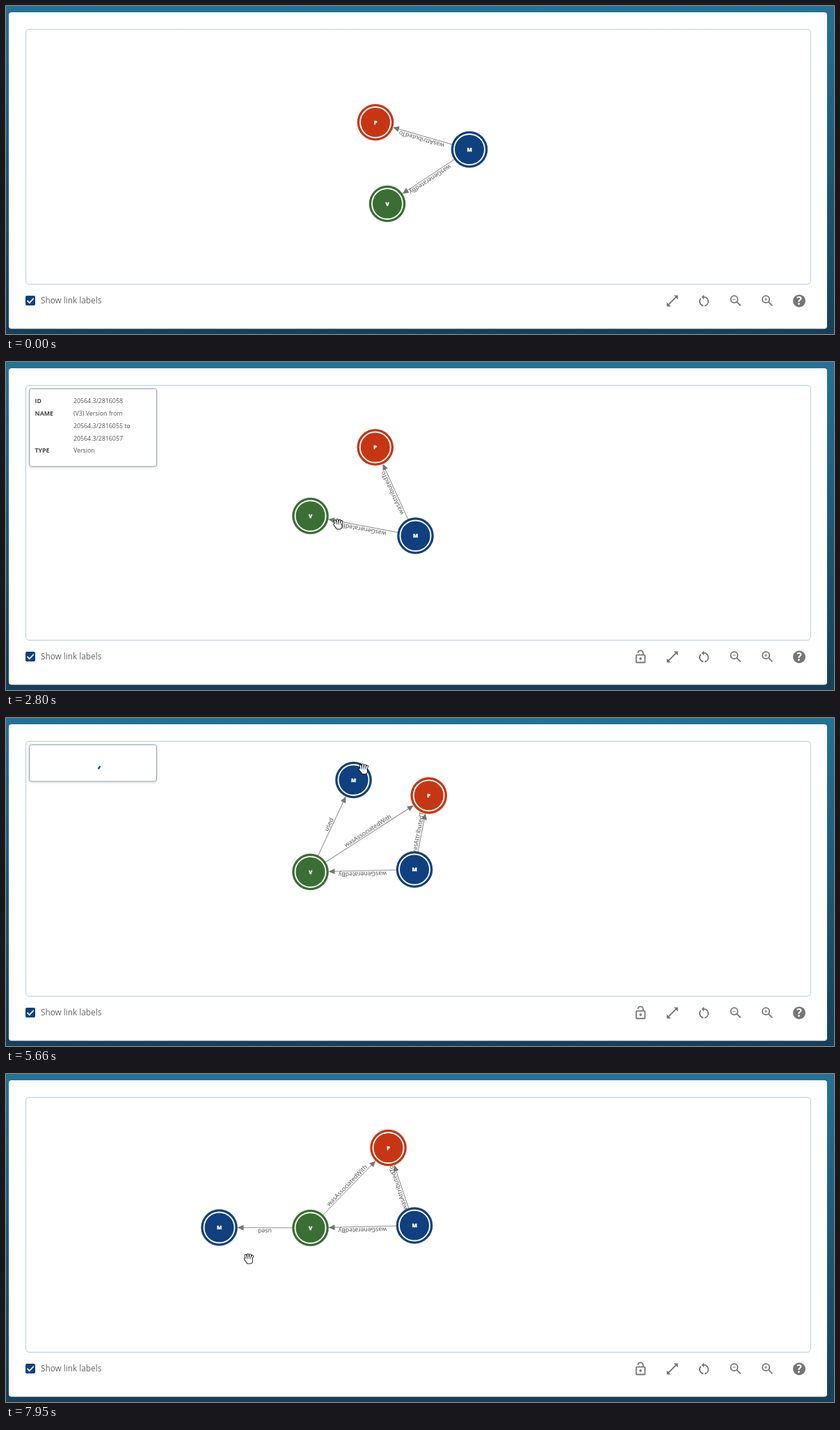
These frames come from a looping animation (1190 px wide and 471 px high, 8 s). An HTML page:

```html
<!DOCTYPE html>
<html lang="en">
<head>
<meta charset="utf-8">
<title>Provenance graph</title>
<style>
  html, body { margin: 0; width: 100%; height: 100%; overflow: hidden; }
  body { background: linear-gradient(#247294, #163f58); }
  svg { display: block; width: 1190px; height: 471px; font-family: "Open Sans", "Noto Sans", sans-serif; }
  .frame { fill: none; stroke: #6797bd; stroke-dasharray: 1 1; }
  .caption { font-size: 11.8px; fill: #666; }
  .icon { fill: none; stroke: #757575; stroke-width: 1.8; }
  .icon .solid { fill: #757575; stroke: none; }
  .icon .thin { stroke-width: .9; }
  .icon text { font-size: 16px; font-weight: 700; fill: #fff; stroke: none; text-anchor: middle; }
  .link line { stroke: #858585; stroke-width: .9; }
  .link path { fill: #757575; }
  .link text { font-size: 8.8px; fill: #4c4c4c; text-anchor: middle; }
  .node text { font-size: 7.5px; font-weight: 800; fill: #fff; stroke: #fff; stroke-width: .35; text-anchor: middle; }
  .node .ring { fill: none; stroke: #fff; stroke-width: 1.9; }
  .panel rect { fill: #fff; stroke: #8c9fb9; filter: drop-shadow(0 1px 2px rgba(0, 0, 0, .15)); }
  .panel text { font-size: 8.8px; fill: #555; }
  .panel .key { font-weight: 700; fill: #444; }
  .spin { fill: none; stroke: #1c4a8c; stroke-width: 2.4; }
  .hand { stroke-linecap: round; stroke-linejoin: round; }
  .outline { fill: #111; stroke: #111; stroke-width: 3.6; }
  .skin { fill: #fff; stroke: #fff; stroke-width: 1.8; }
  .glow { fill: #e2d400; opacity: 0; }
  .down .glow { opacity: .6; }
  .down .hand { transform: scale(.8); }
  .down .outline { fill: none; stroke: #a59c26; }
  .down .skin { fill: #fdf5c0; stroke: #fdf5c0; }
</style>
</head>
<body>
<svg viewBox="0 0 1190 471">
  <rect x="4" y="9" width="1176" height="454.4" rx="4" fill="#fff"/>
  <rect class="frame" x="28.5" y="33.5" width="1128" height="366" rx="5"/>
  <rect x="28" y="416" width="14" height="14" rx="2" fill="#10407f"/>
  <path d="M30.5 423l3.200 3.200 6-6.400" fill="none" stroke="#fff" stroke-width="1.7"/>
  <text class="caption" x="50" y="427">Show link labels</text>
  <g id="tools"></g>
  <g id="links"></g>
  <g id="nodes"></g>
  <g id="panels"></g>
  <g id="cursor"><circle class="glow" r="10"/></g>
</svg>
<script>
const LOOP = 8000, EXPAND = 5040;
const BLUE = '#10407f', RED = '#c73613', GREEN = '#3b6e35';
const $ = id => document.getElementById(id);

function add(parent, tag, attrs, text) {
  const el = document.createElementNS('http://www.w3.org/2000/svg', tag);
  for (const k in attrs) el.setAttribute(k, attrs[k]);
  if (text) el.textContent = text;
  return parent.appendChild(el);
}
const show = (el, on) => el.setAttribute('visibility', on ? 'visible' : 'hidden');
const clamp = (v, lo, hi) => Math.min(hi, Math.max(lo, v));
const shift = (p, x, y) => [p[0] + x, p[1] + y];

// Toolbar: each icon is drawn around its own centre, at an even pitch
const lens = '<circle cx="-2.2" cy="-2.2" r="5"/><path d="M1.4 1.4L7 7"/><path class="thin" d="M-4.5-2.2H0"/>';
const icons = [
  '<rect x="-6.3" y="-2.7" width="12.6" height="10.8" rx="1"/><path d="M-3.7-5.4a3.7 3.7 0 0 1 7.400 0v2.700"/><circle class="solid" cy="2.7" r="1.8"/>',
  '<path d="M-6 6L6-6"/><path class="solid" d="M8-2V-8H2ZM-8 2V8H-2Z"/>',
  '<path d="M0-5.4A6.3 6.3 0 0 1 .9 7.100M-.9 7.100A6.3 6.3 0 0 1-4.500-3.500"/><path class="solid" d="M0-9L-3.600-5.400L0-1.800Z"/>',
  lens,
  lens + '<path class="thin" d="M-2.2-4.5V0"/>',
  '<circle class="solid" r="9"/><text y="5.8">?</text>'
].map((shape, i) => {
  const g = add($('tools'), 'g', { class: 'icon', transform: `translate(${912 + 45.6 * i} 423.4)` });
  g.innerHTML = shape;
  return g;
});
const lock = icons[0];

// Hand cursor: four fanned fingers, a thumb and a palm
let hand = 'M-3 4L-5.4 .5M-3 2H4V5L2.5 6H-1.5Z';
for (let i = 0; i < 4; i++) {
  const fan = (i - 1.2) * .2, len = 8 - Math.abs(i - 1.2) * 1.1;
  hand += `M${2 * i - 3} 2l${len * Math.sin(fan)} ${-len * Math.cos(fan)}`;
}
for (const part of ['outline', 'skin']) add($('cursor'), 'path', { class: 'hand ' + part, d: hand });

// Eased moves: [begin, end, x, y], each starting where the one before stopped
function walk(from, moves, t) {
  let [x, y] = from;
  for (const [a, b, x2, y2] of moves) {
    const u = clamp((t - a) / (b - a), 0, 1), e = u * u * (3 - 2 * u);
    x += (x2 - x) * e;
    y += (y2 - y) * e;
  }
  return [x, y];
}

const cursorAt = t => walk([1025, 425], [
  [70, 800, 547, 288],
  [1770, 2250, 449, 244], [2250, 2530, 436.5, 225],
  [2640, 3100, 582, 252], [3130, 3600, 580.5, 220],
  [4200, 4600, 441, 223], [5060, 5560, 514, 73],
  [5750, 6050, 495, 90], [6050, 6950, 333, 225], [6950, 7400, 302, 221.5],
  [7540, 7930, 349, 265]
], t);

// While held, a node sticks to the cursor
const held = (t, a, b, x, y) => shift(cursorAt(clamp(t, a, b)), x, y);
const place = {
  cursor: cursorAt,
  version: t => held(t, 1770, 2530, 1, -4),
  model: t => t < 3130 ? walk([666, 206], [[1770, 2700, 588.5, 249.5]], t) : held(t, 3130, 3600, 6.5, -2.5),
  input: t => t < 6050 ? walk([437.5, 221], [[EXPAND, 5650, 499.5, 89]], t) : held(t, 6050, 7500, 4.5, -1),
  person: t => walk([531, 167], [
    [1770, 2530, 528, 125], [2530, 4300, 571, 86], [5000, 5850, 613, 115],
    [5900, 6950, 560, 103.5], [6950, 7900, 549.5, 106]
  ], t)
};

// Graph
const links = [
  ['model', 'person', 'wasAttributedTo', 0],
  ['model', 'version', 'wasGeneratedBy', 0],
  ['version', 'person', 'wasAssociatedWith', EXPAND],
  ['version', 'input', 'used', EXPAND]
].map(([from, to, label, start]) => {
  const g = add($('links'), 'g', { class: 'link' });
  const line = add(g, 'line', {});
  const head = add(g, 'path', { d: 'M0 0L-9-4V4Z' });
  const text = add(g, 'text', { y: -2 }, label);
  return { from, to, start, g, line, head, text };
});

const nodes = [
  ['input', 'M', BLUE, EXPAND], ['person', 'P', RED, 0], ['version', 'V', GREEN, 0], ['model', 'M', BLUE, 0]
].map(([id, letter, fill, start]) => {
  const g = add($('nodes'), 'g', { class: 'node' });
  add(g, 'circle', { r: 26.3, fill });
  add(g, 'circle', { r: 22, class: 'ring' });
  add(g, 'text', { y: 2.6 }, letter);
  return { id, start, g };
});

// Each link is laid out flat, then turned towards its end node
function placeLink(l, pos, t) {
  const [x, y] = pos[l.from], [x2, y2] = pos[l.to];
  const len = Math.hypot(x2 - x, y2 - y), turn = Math.atan2(y2 - y, x2 - x) * 180 / Math.PI;
  show(l.g, t >= l.start && len > 54);
  l.g.setAttribute('transform', `translate(${x} ${y}) rotate(${turn})`);
  l.line.setAttribute('x2', len - 34);
  l.head.setAttribute('transform', `translate(${len - 26})`);
  l.text.setAttribute('x', len / 2);
}

// Info panels
function makePanel(height, rows) {
  const g = add($('panels'), 'g', { class: 'panel' });
  add(g, 'rect', { x: 33.5, y: 38.5, width: 183, height, rx: 3 });
  rows.forEach(([key, value], i) => {
    const y = 59.4 + 17.7 * i;
    add(g, 'text', { class: 'key', x: 41.5, y }, key);
    add(g, 'text', { x: 97, y }, value);
  });
  return g;
}
const panels = {
  version: makePanel(111.5, [['ID', '20564.3/2816058'], ['NAME', '(V3) Version from'],
    ['', '20564.3/2816055 to'], ['', '20564.3/2816057'], ['TYPE', 'Version']]),
  model: makePanel(76, [['ID', '20564.3/2816057'], ['NAME', 'Moisture decay graph'], ['TYPE', 'Model']]),
  loading: makePanel(52.5, [])
};
const spin = add(panels.loading, 'path', { class: 'spin', d: 'M10.7-2.5A11 11 0 0 1 10.7 2.5' });

const hovers = [[740, 'version'], [3000, 'model'], [4420, 'version'], [5480, 'loading'], [6120, '']];
const presses = [[1400, 2560], [3130, 3950], [6050, 7480]];

function panelAt(t) {
  const last = hovers.filter(h => t >= h[0]).pop();
  if (!last || !last[1]) return '';
  return t - last[0] < 170 ? 'loading' : last[1];
}

function draw(t) {
  const pos = {};
  for (const id in place) pos[id] = place[id](t);
  links.forEach(l => placeLink(l, pos, t));
  nodes.forEach(n => {
    n.g.setAttribute('transform', `translate(${pos[n.id]})`);
    show(n.g, t >= n.start);
  });

  const current = panelAt(t);
  for (const name in panels) show(panels[name], name === current);
  spin.setAttribute('transform', `translate(125 65) rotate(${34 + (t - 5660) * .257})`);

  show(lock, t >= 1770);
  const cursor = $('cursor');
  show(cursor, t >= 70);
  cursor.setAttribute('transform', `translate(${pos.cursor})`);
  cursor.setAttribute('class', presses.some(([a, b]) => t >= a && t < b) ? 'down' : '');
}

const begin = performance.now();
function tick() {
  draw((performance.now() - begin) % LOOP);
  requestAnimationFrame(tick);
}
tick();
</script>
</body>
</html>
```
